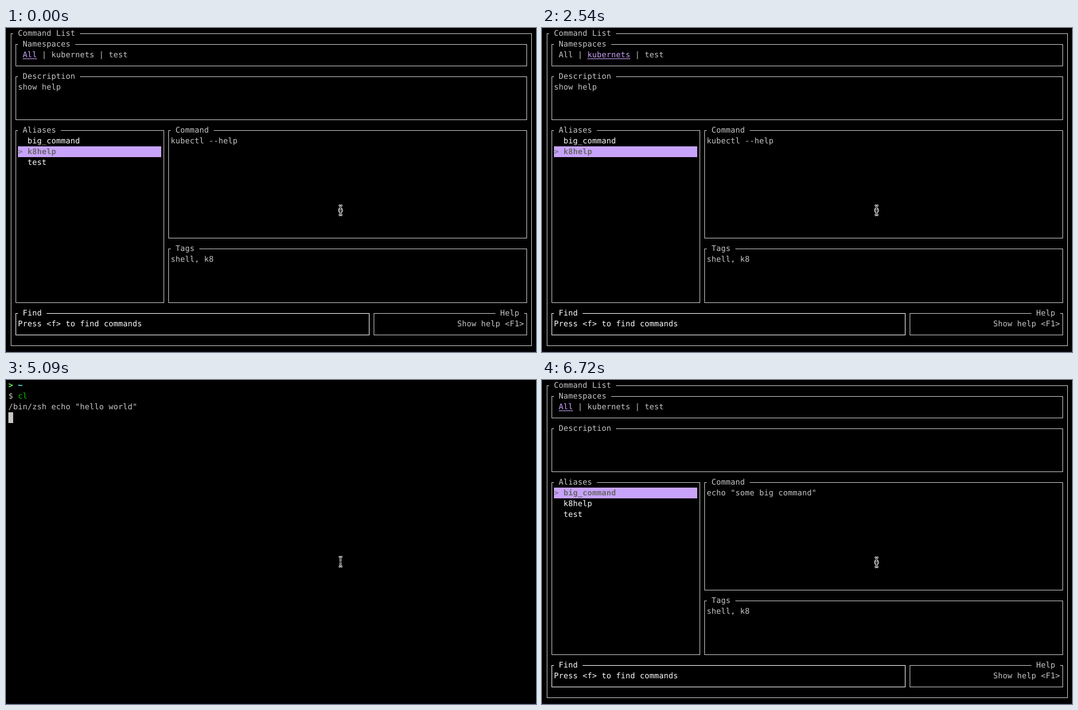
Write an HTML page that moves like this. It is 888 px wide and 542 px high and loops after 8000 ms.

```html
<!DOCTYPE html>
<html lang="en">
<head>
<meta charset="utf-8">
<title>Command List</title>
<style>
  html, body { margin: 0; width: 100%; height: 100%; overflow: hidden; background: #000; }
  svg { display: block; width: 888px; height: 542px; }
  text {
    font: 13px "DejaVu Sans Mono", "Liberation Mono", monospace;
    white-space: pre;
    text-rendering: geometricPrecision;
  }
  .bold { font-weight: bold; }
</style>
</head>
<body>
<svg id="stage" viewBox="0 0 888 542" xmlns="http://www.w3.org/2000/svg"></svg>
<script>
const LOOP = 8000;
const CELL_W = 8, CELL_H = 18, LEFT = 4;
const GRAY = '#c7c7c7', WHITE = '#feffff', PURPLE = '#c8a3fb', DIM = '#686868';
const GREEN = '#00c200', LIME = '#5ffa68', CYAN = '#60fdff';

const colX = col => LEFT + col * CELL_W;
const rowY = row => row * CELL_H;
const escape = s => s.replace(/&/g, '&amp;').replace(/</g, '&lt;').replace(/>/g, '&gt;');

const rect = (x, y, w, h, fill) =>
  `<rect x="${x}" y="${y}" width="${w}" height="${h}" fill="${fill}"/>`;

// Text sits on the terminal grid, one character per cell.
function print(col, row, str, fill = GRAY, cls = '') {
  const xs = [...str].map((_, i) => colX(col + i)).join(' ');
  return `<text class="${cls}" x="${xs}" y="${rowY(row) + 13}" fill="${fill}">${escape(str)}</text>`;
}

const underline = (col, row, length, fill) =>
  rect(colX(col), rowY(row) + 15, length * CELL_W, 1, fill);

const block = (col, row) => rect(colX(col), rowY(row), CELL_W, CELL_H, GRAY);

// A bordered panel between two corner cells, its title set into the top line.
function panel(c0, r0, c1, r1, title, color = GRAY, alignRight = false) {
  const x0 = colX(c0) + 4, x1 = colX(c1) + 4;
  const y0 = rowY(r0) + 9, y1 = rowY(r1) + 9;
  const titleCol = alignRight ? c1 - title.length - 1 : c0 + 2;
  const gap0 = colX(titleCol - 1), gap1 = colX(titleCol + title.length + 1);
  return rect(x0, y0, gap0 - x0, 1, color) +
    rect(gap1, y0, x1 - gap1 + 1, 1, color) +
    rect(x0, y0, 1, y1 - y0 + 1, color) +
    rect(x1, y0, 1, y1 - y0 + 1, color) +
    rect(x0, y1, x1 - x0 + 1, 1, color) +
    print(titleCol, r0, title, color);
}

// The I-beam pointer gains a ring while an application reads the mouse.
function pointer(ringed) {
  const y = ringed ? 305 : 304;
  const beam = `M557.5 ${y - 8}h1.5l1.5 1.5l1.5 -1.5h1.5M560.5 ${y - 7}V${y + 7}` +
    `M557.5 ${y + 8}h1.5l1.5 -1.5l1.5 1.5h1.5M559 ${y + .5}h3`;
  const ring = ringed ? `M558 ${y}a2.5 2.5 0 1 0 5 0a2.5 2.5 0 1 0 -5 0` : '';
  const stroke = (color, width) =>
    `<path d="${beam}${ring}" fill="none" stroke="${color}" stroke-width="${width}"/>`;
  return stroke('#fff', 2.8) + stroke('#000', 1);
}

const COMMANDS = {
  big_command: { description: '', command: 'echo "some big command"', tags: 'shell, k8' },
  k8help: { description: 'show help', command: 'kubectl --help', tags: 'shell, k8' },
  test: { description: 'greetings!', command: 'echo "hello world"', tags: 'shell' }
};
const SPACES = {
  All: ['big_command', 'k8help', 'test'],
  kubernets: ['big_command', 'k8help'],
  test: ['test']
};

function tabs(active) {
  let col = 3, out = '';
  Object.keys(SPACES).forEach((name, i) => {
    if (i) {
      out += print(col + 1, 2, '|');
      col += 3;
    }
    const on = name === active;
    out += print(col, 2, name, on ? PURPLE : GRAY);
    if (on) out += underline(col, 2, name.length, PURPLE);
    col += name.length;
  });
  return out;
}

function aliases(space, selected) {
  return SPACES[space].map((name, i) => {
    const row = 10 + i;
    if (name !== selected) return print(4, row, name, WHITE);
    return rect(20, rowY(row), 240, CELL_H, PURPLE) +
      print(2, row, '>', DIM) + print(4, row, name, DIM, 'bold');
  }).join('');
}

function list(space, selected) {
  const item = COMMANDS[selected];
  return panel(0, 0, 109, 29, 'Command List') +
    panel(1, 1, 108, 3, 'Namespaces') + tabs(space) +
    panel(1, 4, 108, 8, 'Description') + print(2, 5, item.description) +
    panel(1, 9, 32, 25, 'Aliases') + aliases(space, selected) +
    panel(33, 9, 108, 19, 'Command') + print(34, 10, item.command) +
    panel(33, 20, 108, 25, 'Tags') + print(34, 21, item.tags) +
    panel(1, 26, 75, 28, 'Find', WHITE) +
    print(2, 27, 'Press <f> to find commands', WHITE) +
    panel(76, 26, 108, 28, 'Help', GRAY, true) + print(94, 27, 'Show help <F1>') +
    pointer(true);
}

const prompt = row =>
  print(0, row, '>', LIME, 'bold') + print(2, row, '~', CYAN, 'bold') + print(0, row + 1, '$');

function shell({ output = true, ready = true, typed = '', cursor, ringed = false }) {
  let out = prompt(0) + print(2, 1, 'cl', GREEN) + print(0, 2, '/bin/zsh echo "hello world"');
  if (output) out += print(0, 3, 'hello world');
  if (ready) out += prompt(4);
  if (typed) out += print(2, 5, typed, typed === 'cl' ? GREEN : GRAY);
  if (typed === 'c') out += underline(2, 5, 1, GRAY);
  return out + block(...cursor) + pointer(ringed);
}

const STEPS = [
  [0, () => list('All', 'k8help')],
  [900, () => list('All', 'test')],
  [1950, () => list('kubernets', 'big_command')],
  [2540, () => list('kubernets', 'k8help')],
  [2840, () => list('kubernets', 'big_command')],
  [3140, () => list('kubernets', 'k8help')],
  [3440, () => list('test', 'test')],
  [5090, () => shell({ output: false, ready: false, cursor: [0, 3] })],
  [5230, () => shell({ ready: false, cursor: [0, 4] })],
  [5380, () => shell({ cursor: [2, 5] })],
  [5980, () => shell({ typed: 'c', cursor: [3, 5] })],
  [6120, () => shell({ typed: 'cl', cursor: [4, 5] })],
  [6420, () => shell({ typed: 'cl', cursor: [0, 6] })],
  [6570, () => shell({ typed: 'cl', cursor: [0, 6], ringed: true })],
  [6720, () => list('All', 'big_command')]
];

const stage = document.getElementById('stage');
const backdrop = rect(0, 0, 888, 542, '#100a20') +
  '<path d="M0 0H888V536Q888 541 883 541H5Q0 541 0 536Z" fill="#000"/>';
const start = performance.now();
let shown = null;

function draw() {
  const time = (performance.now() - start) % LOOP;
  const step = STEPS.filter(([at]) => at <= time).pop();
  if (step !== shown) {
    stage.innerHTML = backdrop + step[1]();
    shown = step;
  }
  requestAnimationFrame(draw);
}
draw();
</script>
</body>
</html>
```
